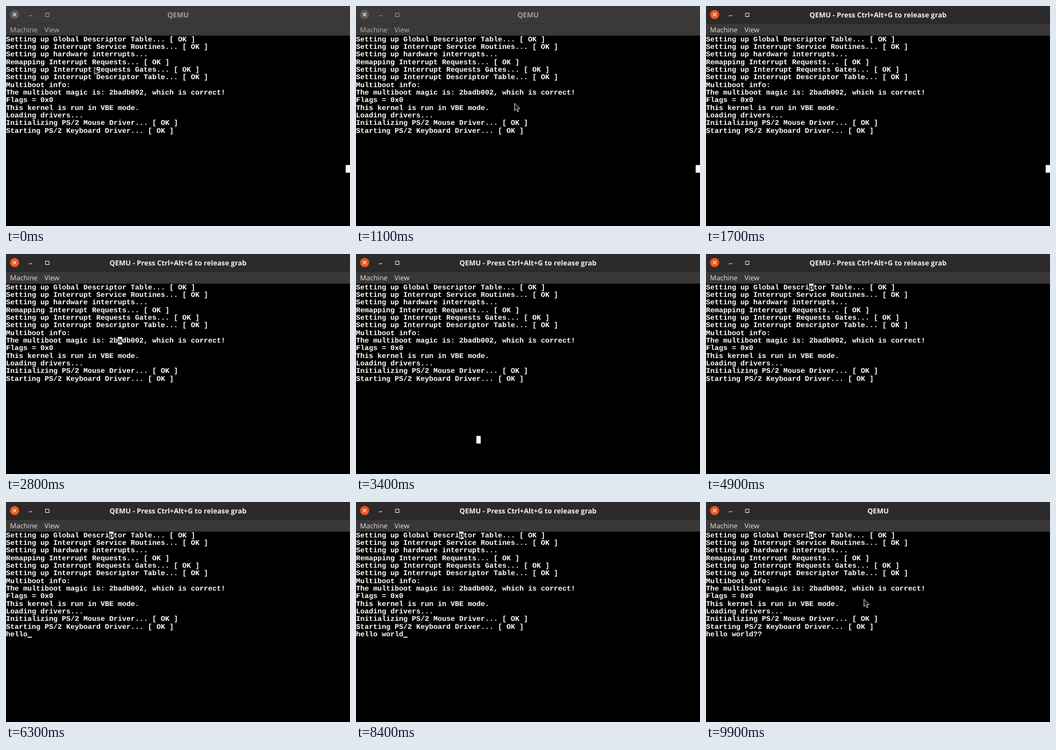
An HTML page with a canvas for the animation above (10000 ms loop, 600x385 px).

```html
<!DOCTYPE html>
<html lang="en">
<head>
<meta charset="utf-8">
<title>Kernel console</title>
<style>
  html, body { margin: 0; width: 100%; height: 100%; overflow: hidden; background: #000; }
  canvas { display: block; }
</style>
</head>
<body>
<canvas id="stage" width="600" height="385"></canvas>
<script>
const ctx = document.getElementById('stage').getContext('2d');
ctx.textRendering = 'geometricPrecision';

const LOOP = 10000, STEP = 100;
const CELL_W = 7.5, CELL_H = 40 / 3, TOP = 385 - 25 * CELL_H;
const GRAB = 1600, RELEASE = 9300, POINTER_BACK = 9900;

const LOG = [
  'Setting up Global Descriptor Table... [ OK ]',
  'Setting up Interrupt Service Routines... [ OK ]',
  'Setting up hardware interrupts...',
  'Remapping Interrupt Requests... [ OK ]',
  'Setting up Interrupt Requests Gates... [ OK ]',
  'Setting up Interrupt Descriptor Table... [ OK ]',
  'Multiboot info:',
  'The multiboot magic is: 2badb002, which is correct!',
  'Flags = 0x0',
  'This kernel is run in VBE mode.',
  'Loading drivers...',
  'Initializing PS/2 Mouse Driver... [ OK ]',
  'Starting PS/2 Keyboard Driver... [ OK ]'
];
const INPUT = 'hello world??';
const KEY_TIMES = [5400, 5600, 5700, 5800, 6200, 6700, 7200, 7400, 7800, 8000, 8300, 9000, 9200];

// [time, column, row] of the guest's block pointer
const BLOCK_PATH = [
  [1700, 79, 17], [2100, 52, 14], [2500, 26, 7], [2800, 26, 7],
  [3050, 33, 16], [3300, 30, 24], [3800, 20, 3], [4000, 17, 2], [4100, 17, 2],
  [4400, 24, 9], [4500, 24, 9], [4600, 23, 16], [4900, 24, 0]
];

function along(path, t) {
  const next = path.findIndex(p => p[0] > t);
  if (next === 0) return path[0].slice(1);
  if (next < 0) return path[path.length - 1].slice(1);
  const a = path[next - 1], b = path[next], k = (t - a[0]) / (b[0] - a[0]);
  return [a[1] + (b[1] - a[1]) * k, a[2] + (b[2] - a[2]) * k];
}

function rect(x, y, w, h, color) {
  ctx.fillStyle = color;
  ctx.fillRect(x, y, w, h);
}

function label(text, x, y, font, color, align = 'left') {
  ctx.font = font;
  ctx.fillStyle = color;
  ctx.textAlign = align;
  ctx.fillText(text, x, y);
}

function polyline(points, close) {
  ctx.beginPath();
  points.forEach(([x, y]) => ctx.lineTo(x, y));
  if (close) ctx.closePath();
}

function drawWindow(focused, grabbed) {
  const ink = focused ? '#f2f1f0' : '#a3a19f';
  rect(0, 0, 600, 31, focused ? '#2c2a2a' : '#3b3939');
  rect(0, 31, 600, TOP - 31, focused ? '#3a3737' : '#3b3838');
  rect(0, 30, 600, 1, focused ? '#242222' : '#333131');

  ctx.fillStyle = focused ? '#e95420' : '#5b5857';
  ctx.beginPath();
  ctx.arc(15, 15, 8, 0, Math.PI * 2);
  ctx.fill();
  ctx.strokeStyle = '#f5f5f5';
  ctx.lineWidth = 1.2;
  for (const d of [-3, 3]) {
    polyline([[15 - d, 12], [15 + d, 18]]);
    ctx.stroke();
  }
  rect(40, 16.5, 6, 1, ink);
  ctx.strokeStyle = ink;
  ctx.lineWidth = 1;
  ctx.strokeRect(69, 12.5, 6, 6);

  const title = grabbed ? 'QEMU - Press Ctrl+Alt+G to release grab' : 'QEMU';
  label(title, 300, 20, 'bold 12.2px "Open Sans", sans-serif', ink, 'center');
  const menuInk = focused ? '#e4e2e1' : '#b5b3b2';
  const menuFont = '12.1px "Open Sans", sans-serif';
  label('Machine', 7, 46, menuFont, menuInk);
  label('View', 67, 46, menuFont, menuInk);
}

function drawGlyph(char, col, row, color) {
  label(char, (col + 0.5) * CELL_W, TOP + row * CELL_H + 10,
    'bold 12.5px "Liberation Mono", monospace', color, 'center');
}

function drawConsole(t) {
  rect(0, TOP, 600, 385 - TOP, '#000');
  const typed = KEY_TIMES.filter(time => time <= t).length;
  const lines = [...LOG, INPUT.slice(0, typed)];
  lines.forEach((line, row) =>
    [...line].forEach((char, col) => drawGlyph(char, col, row, '#fff')));

  if (t % 540 >= 270) {
    rect(typed * CELL_W, TOP + LOG.length * CELL_H + 10.8, CELL_W, 1.7, '#fff');
  }

  const [col, row] = along(BLOCK_PATH, t).map(Math.round);
  rect(col * CELL_W, TOP + row * CELL_H, CELL_W, CELL_H, '#fff');
  const covered = (lines[row] || '')[col];
  if (covered) drawGlyph(covered, col, row, '#000');
}

function drawPointer(t) {
  if (t >= GRAB && t < POINTER_BACK) return;
  const k = Math.min(t / 900, 1), ease = k * k * (3 - 2 * k);
  const settle = t >= 1200 ? 0 : ease;
  ctx.save();
  ctx.translate(154 + 121.5 * ease + settle, 107 + 63 * ease);
  polyline([[0, 0], [0, 13], [3, 10.3], [5.3, 15], [7.3, 14], [5.2, 9.5], [9.3, 9.5]], true);
  ctx.fillStyle = '#1c1c1c';
  ctx.fill();
  ctx.strokeStyle = '#d8d8d8';
  ctx.lineWidth = 1;
  ctx.stroke();
  ctx.restore();
}

function draw(now) {
  const t = Math.floor(now % LOOP / STEP) * STEP;
  drawConsole(t);
  drawWindow(t >= GRAB, t >= GRAB && t < RELEASE);
  drawPointer(t);
  requestAnimationFrame(draw);
}
draw(0);
</script>
</body>
</html>
```
